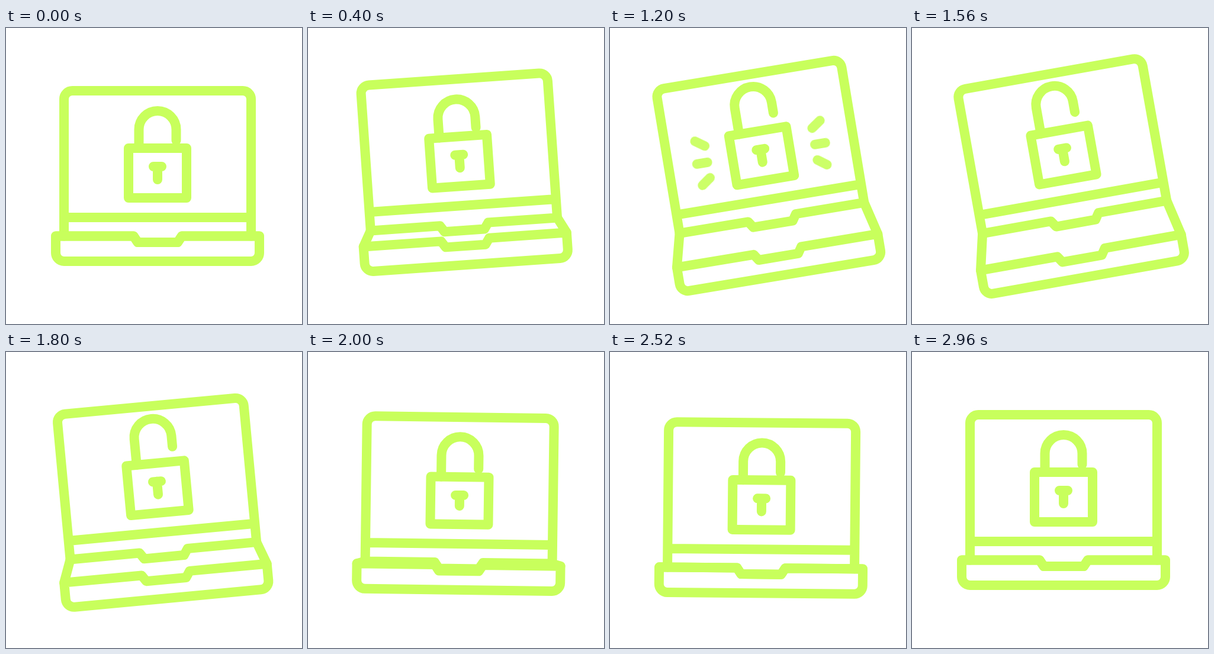
These frames come from a looping animation (500 by 500 pixels, 3 s). An HTML page:

```html
<!DOCTYPE html>
<html lang="en">
<head>
<meta charset="utf-8">
<title>Unlocking laptop</title>
<style>
  html, body { margin: 0; width: 100%; height: 100%; overflow: hidden; background: #fff; }
  svg { display: block; width: 100vw; height: 100vh; }
</style>
</head>
<body>
<svg viewBox="0 0 500 500">
  <g id="laptop" fill="none" stroke="#c8ff5c" stroke-width="16" stroke-linecap="round" stroke-linejoin="round">
    <path d="M98 351.5V120a14 14 0 0 1 14-14H400a14 14 0 0 1 14 14V351.5H297L290 362H222.5L215.5 351.5ZM98 320H414"/>
    <path id="hinges"/>
    <path id="base" d="M84 351.5V380a14 14 0 0 0 14 14H414a14 14 0 0 0 14-14V351.5H297L290 362H222.5L215.5 351.5Z"/>
    <path id="shackle"/>
    <path id="body"/>
    <path id="keyhole"/>
    <g id="sparks">
      <path id="rays" d="M348 213L363 202.5M348 241H366M348 267.5L362.5 278"/>
      <use href="#rays" transform="matrix(-1 0 0 1 512 0)"/>
    </g>
  </g>
</svg>
<script>
const LOOP = 3000, STEP = 40;

// Eased progress from 0 to 1 between two times.
const linear = u => u;
const soft = u => (u + u * u * (3 - 2 * u)) / 2;
const settle = u => Math.sin(u * Math.PI / 2);
const ramp = (t, from, to, ease = soft) =>
  ease(Math.min(1, Math.max(0, (t - from) / (to - from))));

// Open quickly, keep drifting, then swing back past rest and settle.
const tilt = t =>
  -6.5 * ramp(t, 80, 620) - 3.6 * ramp(t, 620, 1580, settle)
  + 17.4 * ramp(t, 1580, 2280) - 11.2 * ramp(t, 2280, 2690) + 3.9 * ramp(t, 2690, 2960);

const shift = t =>
  -20.5 * ramp(t, 80, 420) - 10 * ramp(t, 420, 1580, settle)
  + 53.5 * ramp(t, 1580, 2260) - 23 * ramp(t, 2260, 2860);

const opening = t =>
  49 * ramp(t, 110, 660) + 12 * ramp(t, 660, 1580, linear) - 61 * ramp(t, 1640, 2040);

const pulse = (t, start, full, hold, end) => ramp(t, start, full) - ramp(t, hold, end);

const set = (id, name, value) => document.getElementById(id).setAttribute(name, value);

function draw(t) {
  const hinge = 351.5 + opening(t);
  const lift = 13 * pulse(t, 600, 820, 1780, 2020);
  const press = 4 * pulse(t, 1900, 2000, 2000, 2160);
  const top = 203 + press, slot = 234 + press;

  set("laptop", "transform", `translate(0 ${shift(t)}) rotate(${tilt(t)} 256 245)`);
  set("base", "transform", `translate(0 ${opening(t)})`);
  set("hinges", "d", `M98 351.5L84 ${hinge}M414 351.5L428 ${hinge}`);
  set("shackle", "d", `M224.5 ${top}V${171.5 - lift}a31.5 31.5 0 0 1 63 0V${190 - lift + press}`);
  set("body", "d", `M207 ${top}H305V287H207Z`);
  set("keyhole", "d", `M249 ${slot}H263M256 ${slot}V256`);
  set("sparks", "opacity", pulse(t, 760, 920, 1180, 1360));
}

const start = performance.now();
function tick() {
  const t = (performance.now() - start) % LOOP;
  draw(Math.floor(t / STEP) * STEP);
  requestAnimationFrame(tick);
}
tick();
</script>
</body>
</html>
```
